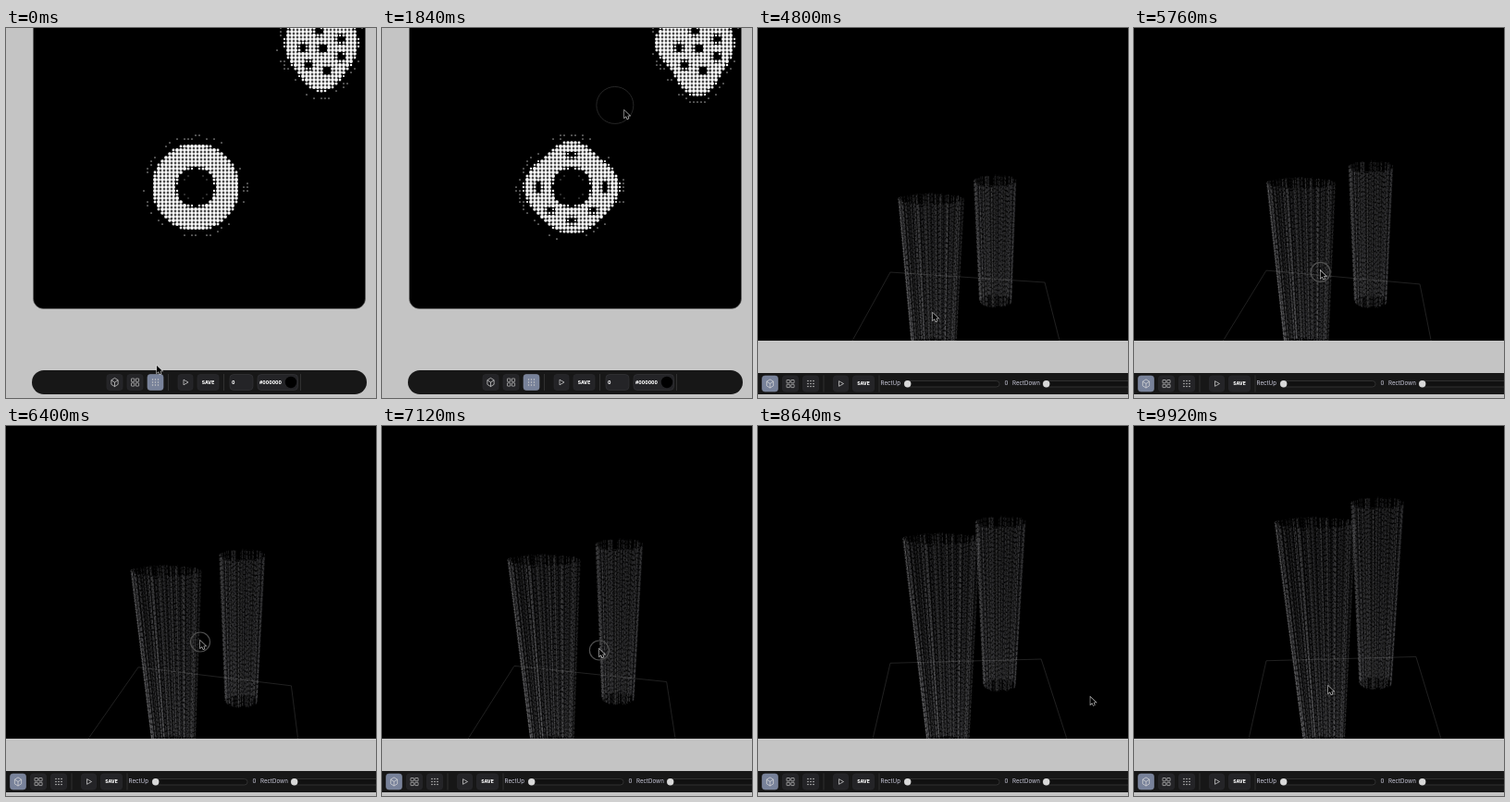
These frames come from a looping animation (400x400 px, 10000 ms). An HTML page with a canvas:

```html
<!DOCTYPE html>
<html lang="en">
<meta charset="utf-8">
<style>
  html, body { margin: 0; width: 100%; height: 100%; overflow: hidden; background: #c4c4c4; }
  canvas { display: block; width: 400px; height: 400px; }
</style>
<canvas id="stage"></canvas>
<script>
const LOOP = 10000, STEP = 80, CUT = 4320, TAU = Math.PI * 2;
const canvas = document.getElementById('stage');
const ratio = window.devicePixelRatio || 1;
canvas.width = canvas.height = 400 * ratio;
const c = canvas.getContext('2d');
c.scale(ratio, ratio);

const { sin, cos, abs, min, max, hypot, floor } = Math;
const mix = (a, b, k) => a + (b - a) * k;
const clamp = (v, lo, hi) => min(hi, max(lo, v));

function randomFrom(seed) {
  return () => {
    seed = seed + 0x6D2B79F5 | 0;
    let n = Math.imul(seed ^ seed >>> 15, 1 | seed);
    n = n + Math.imul(n ^ n >>> 7, 61 | n) ^ n;
    return ((n ^ n >>> 14) >>> 0) / 4294967296;
  };
}

// Rows are [time, ...values]; values are interpolated linearly.
function keyed(rows, t) {
  let i = 1;
  while (i < rows.length - 1 && rows[i][0] < t) i++;
  const [a, b] = [rows[i - 1], rows[i]];
  const k = clamp((t - a[0]) / (b[0] - a[0]), 0, 1);
  return a.slice(1).map((v, j) => mix(v, b[j + 1], k));
}

function box(x, y, w, h, r, fill, stroke) {
  c.beginPath();
  c.roundRect(x, y, w, h, r);
  if (fill) { c.fillStyle = fill; c.fill(); }
  if (stroke) { c.strokeStyle = stroke; c.lineWidth = .6; c.stroke(); }
}

function disc(x, y, r, fill) {
  c.beginPath();
  c.arc(x, y, r, 0, TAU);
  c.fillStyle = fill;
  c.fill();
}

function ring(x, y, r, color, width) {
  c.beginPath();
  c.arc(x, y, r, 0, TAU);
  c.strokeStyle = color;
  c.lineWidth = width;
  c.stroke();
}

function line(points, color, width = .7, close = false) {
  c.beginPath();
  points.forEach(([x, y]) => c.lineTo(x, y));
  if (close) c.closePath();
  c.strokeStyle = color;
  c.lineWidth = width;
  c.stroke();
}

function text(s, x, y, font, color = '#fff', align = 'left') {
  c.font = font + ' Inter, sans-serif';
  c.fillStyle = color;
  c.textAlign = align;
  c.textBaseline = 'middle';
  c.fillText(s, x, y);
}

function cursor(x, y) {
  const shape = [[0, 0], [0, 8], [1.9, 6.3], [3.2, 9.2], [4.6, 8.6], [3.4, 5.8], [5.9, 5.8]];
  line(shape.map(([dx, dy]) => [x + dx, y + dy]), '#ddd', 1.1, true);
  c.fillStyle = '#000';
  c.fill();
}

// Toolbar
function button(x, y, w, selected) {
  box(x - w / 2, y - 8.5, w, 17, 3, selected ? '#78829a' : '#242427', selected ? '#858ea3' : '#2c2c30');
}

const icons = [
  (x, y) => {
    const hex = Array.from({ length: 6 }, (_, i) => [x + 4.2 * sin(i * TAU / 6), y - 4.6 * cos(i * TAU / 6)]);
    line(hex, '#ddd', .7, true);
    for (const i of [1, 3, 5]) line([[x, y], hex[i]], '#ddd');
  },
  (x, y) => {
    for (const dx of [-4, .8]) for (const dy of [-4, .8]) box(x + dx, y + dy, 3.3, 3.3, .3, null, '#ddd');
  },
  (x, y) => {
    for (const dx of [-3, 0, 3]) for (const dy of [-3, 0, 3]) disc(x + dx, y + dy, .75, '#ccc');
  }
];

function tools(x, y, selected) {
  const divider = dx => line([[x + dx, y - 9], [x + dx, y + 9]], '#3c3c3c');
  icons.forEach((icon, i) => {
    button(x + i * 22, y, 17, i === selected);
    icon(x + i * 22, y);
  });
  divider(58);
  button(x + 76.5, y, 16);
  line([[x + 74.5, y - 2.8], [x + 79.5, y], [x + 74.5, y + 2.8]], '#ddd', .7, true);
  button(x + 101, y, 23);
  text('SAVE', x + 101, y + .3, '800 5px', '#fff', 'center');
  divider(118);
}

function field(label, x, y, w) {
  box(x, y - 8.5, w, 17, 4, '#242427', '#38383c');
  text(label, x + 2, y + .3, '800 5px');
}

function slider(label, x, trackX, y) {
  text(label, x, y - .2, '6.2px', '#ccd');
  box(trackX, y - 3, 103, 6.5, 3.2, '#111', '#444');
  disc(trackX + 3.7, y + .3, 3.7, '#d8d8d8');
}

// Dotted growth: depth is the distance inside the shape, p the progress.
const SPOTS = [[337, 2], [361, 11], [320, 20], [341, 21], [361, 30], [326, 39], [346, 45]];

function blobDepth(dx, dy, p) {
  const r = hypot(dx, dy) || 1;
  const down = max(0, dy / r), left = max(0, -dx / r);
  const edge = 39 + (13 + 11 * p) * down ** 8 + 15 * p * left ** 10;
  const spot = min(...SPOTS.map(([x, y]) => hypot(340 + dx - x, 15 + dy - y)));
  return min(edge - r, spot - 5.2);
}

function ringDepth(dx, dy, p) {
  const a = Math.atan2(dy, dx), r = hypot(dx, dy);
  const grow = 2.25 + 5.75 * cos(4 * a) + 2 * cos(2 * a) + 5 * sin(a) * sin(2 * a) ** 2;
  const open = clamp((p - .1) * 3, 0, 1.3);
  const gap = (x, y, rx, ry) => open ? (hypot((abs(dx) - x) / rx, (dy - y) / ry) - open) * 4 : 99;
  return min(46.5 + p * grow - r, r - 21.5,
    gap(0, -35, 6.5, 3.6), gap(36, 0, 4.2, 6.5), gap(0, 36, 6, 4), gap(23, 25, 5, 4));
}

function dots(depth, cx, cy, p) {
  const random = randomFrom(5);
  for (let x = cx % 4 - 4 + floor(cx / 4) * 4 - 64; x < cx + 68; x += 4) {
    for (let y = floor(cy / 4) * 4 - 68; y < cy + 84; y += 4) {
      const d = depth(x - cx, y - cy, p), halo = random() < .4;
      if (d > -1.5) disc(x, y, clamp(1.5 + d * .3, .8, 1.95), '#fff');
      else if (halo && d > -10 && d < -5 && hypot(x - cx, y - cy) > 30) disc(x, y, .85, '#999');
    }
  }
}

const flatPath = [
  [300, 163, 365], [1000, 165, 230], [1300, 150, 110], [1550, 220, 66], [1840, 262, 89],
  [3000, 117, 262], [3200, 110, 264], [4100, 117, 381]
];

function flatScene(t) {
  const p = t / 4200;
  c.save();
  box(29.5, -20, 359, 323.5, 11, '#000', '#666');
  c.clip();
  dots(ringDepth, 205, 172, p);
  for (const [dx, dy] of [[8, 12], [12, 8]]) for (const sx of [-1, 1]) for (const sy of [-1, 1]) {
    disc(205 + sx * dx, 172 + sy * dy, .7, '#777');
  }
  dots(blobDepth, 341, 16, p);
  ring(...keyed(flatPath, t - 70), 20, '#303030', .8);
  c.restore();

  box(28, 370, 362, 26, 13, '#171717');
  tools(117.5, 383, 2);
  field('0', 242, 383, 25);
  field('#000000', 272, 383, 43.5);
  disc(308, 383, 6.2, '#000');
  line([[318.5, 374], [318.5, 392]], '#3c3c3c');
  cursor(...keyed(flatPath, t));
}

// Extruded view: the columns rise with time s while dragging turns the view.
const turnKeys = [[5280, 0], [6400, -1], [7760, -.4], [8420, 1.7]];
const deepPath = [
  [CUT, 117, 381], [4800, 189, 308], [6400, 210, 232], [7760, 257, 249], [8420, 385, 295], [9920, 210, 281]
];

// Both ends are { x, y, half }: centre, height on screen and half width.
function column(seed, count, top, base) {
  const random = randomFrom(seed);
  c.lineWidth = .7;
  for (let i = 0; i < count; i++) {
    const u = clamp((i + random()) / count * 2 - 1, -1, 1);
    const v = (random() < .5 ? -1 : 1) * Math.sqrt(1 - u * u) * mix(.6, 1, random());
    const shade = random();
    c.strokeStyle = `rgba(200,200,205,${.1 + .2 * shade ** 2 + (u < -.93 ? .14 : 0)})`;
    c.setLineDash([1 + shade * 4, .6 + random() * 1.4]);
    c.lineDashOffset = random() * 5;
    c.beginPath();
    c.moveTo(top.x + u * top.half, top.y + 7 * (1 + v));
    c.lineTo(base.x + u * base.half, base.y - 8 * (1 - v));
    c.stroke();
  }
  c.setLineDash([]);
}

function deepScene(t) {
  const s = (t - 4800) / 1000, [turn] = keyed(turnKeys, t);
  c.save();
  box(0, 0, 400, 338, 0, '#000');
  c.clip();
  line([
    [102 + 13 * turn, 338], [143, 264 - 2 * s],
    [310 - s, 275 - 2 * s - 9 * turn], [326 - 1.5 * s + 8 * turn, 338]
  ], '#303030', .7);
  column(7, 85,
    { x: 256.5 + .7 * s + 2 * turn, y: 158 - 16 * s, half: 23 + 1.1 * s },
    { x: 257 + 2.5 * turn, y: 303 - 1.7 * s - 5 * turn, half: 17.5 });
  column(3, 125,
    { x: 187 - 2 * s + 11 * turn, y: 178 - 18.5 * s + .55 * s * s, half: 36 + 1.6 * s },
    { x: 190 + 9 * turn, y: 350, half: 24.5 - .4 * s });
  c.restore();

  box(-10, 373, 420, 23, 0, '#171717');
  tools(13, 384.5, 0);
  slider('RectUp', 132.5, 158, 384.5);
  text('0', 266.5, 384.3, '6.2px', '#ccd');
  slider('RectDown', 275, 308, 384.5);

  const [x, y] = keyed(deepPath, t);
  if (t >= 5280 && t < 8450) ring(x, y + 1.5, 10.5, '#505050', 1.2);
  cursor(x, y);
}

function draw(now) {
  const t = floor(now % LOOP / STEP) * STEP;
  c.fillStyle = '#c4c4c4';
  c.fillRect(0, 0, 400, 400);
  (t < CUT ? flatScene : deepScene)(t);
  requestAnimationFrame(() => draw(performance.now() - start));
}
const start = performance.now();
draw(0);
</script>
</html>
```
